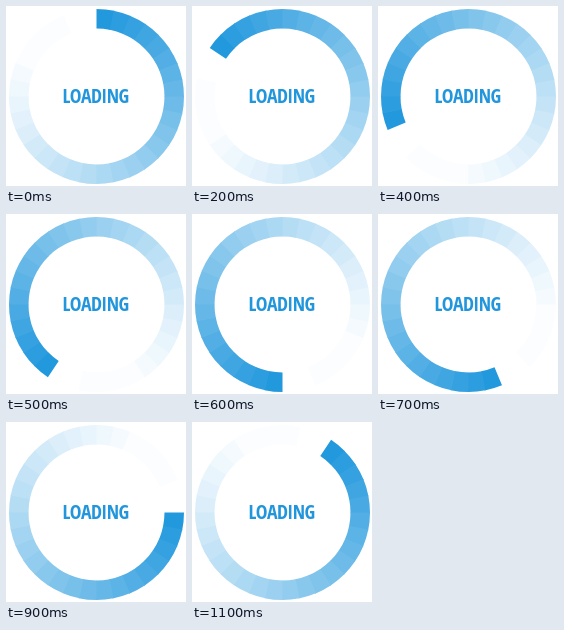
These frames come from a looping animation (180x180 px, 1200 ms). An HTML page:

```html
<!DOCTYPE html>
<html lang="en">
<head>
<meta charset="utf-8">
<title>Loading</title>
<style>
  html, body { margin: 0; width: 100%; height: 100%; overflow: hidden; background: #fff; }
  svg { display: block; width: 180px; height: 180px; }
  text {
    font-size: 24px;
    font-weight: 500;
    font-stretch: 75%;
    letter-spacing: -.03em;
    text-anchor: middle;
    fill: #2196dc;
  }
</style>
</head>
<body>
<svg viewBox="0 0 180 180">
  <g id="ring" fill="none" stroke-width="19.5"></g>
  <text id="label" x="89.5" y="89.5" dy=".357em">LOADING</text>
</svg>
<script>
const SEGMENTS = 32, STEPS = 12, STEP_MS = 100, CENTER = 90.5, RADIUS = 77.75;
const LABEL_WIDTH = 66;
const ring = document.getElementById('ring');
const label = document.getElementById('label');
const blue = [34, 152, 221];

const tint = a => `rgb(${blue.map(c => Math.round(255 + (c - 255) * a))})`;

function point(i) {
  const a = i / SEGMENTS * 2 * Math.PI;
  return `${CENTER + RADIUS * Math.sin(a)} ${CENTER - RADIUS * Math.cos(a)}`;
}

// Each segment runs slightly under the next one, which hides the seams.
for (let i = 0; i < 30; i++) {
  const arc = document.createElementNS('http://www.w3.org/2000/svg', 'path');
  const fade = Math.max(0, 1 - i / 27) ** 1.2;
  arc.setAttribute('d', `M${point(i)}A${RADIUS} ${RADIUS} 0 0 1 ${point(i + 1.05)}`);
  arc.setAttribute('stroke', tint(Math.max(.015, fade)));
  ring.append(arc);
}

// Set the label in the narrowest face, as large as the space allows.
function widthIn(family) {
  label.style.fontFamily = `"${family}", sans-serif`;
  return label.getComputedTextLength();
}
const faces = ['Roboto Condensed', 'Open Sans Condensed', 'Liberation Sans Narrow',
  'Roboto', 'Open Sans', 'Noto Sans', 'Lato'];
const narrowest = faces.reduce((a, b) => widthIn(b) < widthIn(a) ? b : a);
label.style.fontSize = Math.min(24, 24 * LABEL_WIDTH / widthIn(narrowest)) + 'px';

const start = performance.now();
function draw() {
  const step = Math.floor((performance.now() - start) / STEP_MS) % STEPS;
  const turn = Math.floor(step * SEGMENTS / STEPS) * 360 / SEGMENTS;
  ring.setAttribute('transform', `rotate(${-turn} ${CENTER} ${CENTER})`);
  requestAnimationFrame(draw);
}
draw();
</script>
</body>
</html>
```
